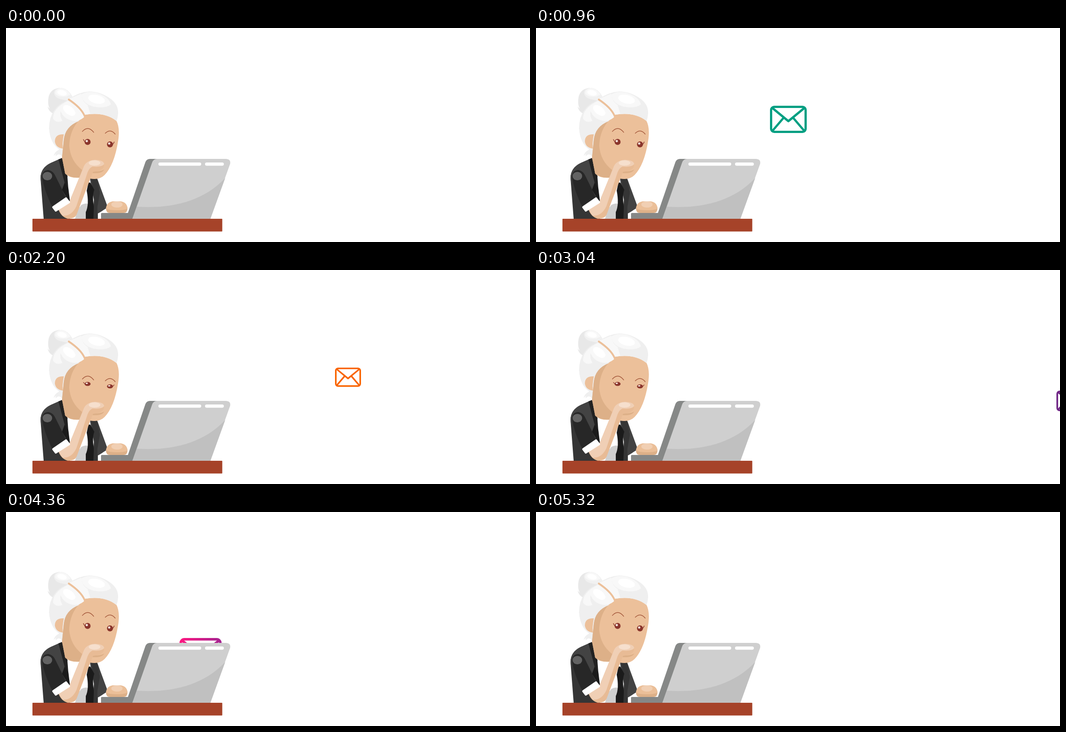
An HTML page for the animation above (5600 ms loop, 1169 px wide and 479 px high).

```html
<!DOCTYPE html>
<html lang="en">
<head>
<meta charset="utf-8">
<title>Mail at the laptop</title>
<style>
html, body { margin: 0; width: 100%; height: 100%; overflow: hidden; background: #fff; }
svg { display: block; width: 100%; height: 100%; }
</style>
</head>
<body>
<svg viewBox="0 0 1169 479">
  <defs>
    <linearGradient id="pink" gradientUnits="userSpaceOnUse" x1="0" y1="0" x2="82" y2="0">
      <stop stop-color="#ff1780"/><stop offset="1" stop-color="#a42290"/>
    </linearGradient>
    <g id="envelope" fill="none" stroke-width="5" stroke-linejoin="round">
      <rect x="2.5" y="2.5" width="77" height="56" rx="7"/>
      <path d="M4 4L41 34.5 78 4M4 58L29.5 28M78 58L52.5 28"/>
    </g>
  </defs>

  <g id="mail"></g>

  <g id="jacket">
    <path fill="#353535" d="M125 291L100 302Q77 313 77 336L84 427H150L142 385 138 335Z"/>
    <path fill="#434343" d="M118 294L100 302Q77 313 77 336L79 350Q80 318 95 318Q105 320 111 333L126 362 131 346Z"/>
    <path fill="#222" d="M117 294L125 291 138 335 139 358 131 347Z"/>
    <path fill="#fff" d="M137 333H186L181 360 184 395 179 427H142L141 385Z"/>
    <path fill="#cfcfcf" d="M154 427L161 404Q166 400 168 396Q177 391 183 394L179 427Z"/>
    <path fill="#434343" d="M187 336H203L225 396Q223 406 205 415V427H192L196 385Z"/>
    <path fill="#353535" d="M190 337H203L211 360 204 400V427H192L197 385Z"/>
    <path fill="#434343" d="M203 336L225 396 223 404 205 415 211 375Z"/>
    <path fill="#1b1b1b" d="M184 346L180 364Q186 395 178 412V427H195L196 400Q192 375 197 362L188 346Z"/>
    <path fill="#fff" d="M205 416L222 406 226 414H212V427H205Z"/>
    <path fill="#272727" d="M80 333Q81 318 95 318Q106 320 111 333L133 379 104 402Q86 366 80 333Z"/>
    <path fill="#1b1b1b" d="M131 346L139 358 143 390 125 362Z"/>
    <ellipse cx="92.3" cy="331.5" rx="10.7" ry="9.5" fill="#636363"/>
  </g>

  <g id="head">
    <path fill="#e8e8e8" d="M148 154Q138 135 121 134Q100 135 95 154Q92 172 98 181L93 176Q95 186 104 191L130 172Z"/>
    <path fill="#f1f1f1" d="M148 153Q137 134 121 134Q108 136 107 144Q108 157 125 160L139 163Z"/>
    <path fill="#f8f8f8" d="M144 149Q136 136 122 134Q108 138 110 147Q117 156 135 153Z"/>
    <ellipse cx="125" cy="145" rx="11" ry="6" fill="#fff" transform="rotate(15 125 145)"/>
    <path fill="#efefef" d="M138 162Q97 177 96 224Q98 258 119 272Q108 277 106 287L112 281Q110 285 111 287Q119 278 126 289L135 240 160 211Q176 205 175 197Q164 177 138 162Z"/>
    <path fill="#ecc09a" d="M177 194Q218 187 246 207Q254 222 251 247Q243 305 220 329Q208 341 187 337L164 335Q143 337 132 326L125 290 129 250Q133 223 160 210Z"/>
    <path fill="#ddb088" d="M161 209Q132 221 129 250L125 290 132 326Q143 336 164 335L170 318Q144 298 141 264Q142 231 161 209Z"/>
    <path fill="#ddb088" d="M190 320Q207 323 219 317Q215 326 194 325Z"/>
    <path fill="#ecc09a" d="M129 238Q109 237 109 254Q111 268 127 270Q125 258 129 238Z"/>
    <path fill="#efefef" d="M140 159Q163 143 186 142Q213 143 234 159Q251 172 250 191Q249 205 246 208Q220 187 177 194Q168 176 140 159Z"/>
    <path fill="#f8f8f8" d="M168 149Q180 140 202 145Q229 153 234 171Q222 181 195 176Q170 169 168 149Z"/>
    <path fill="#f8f8f8" d="M140 159L168 147Q169 164 182 172L188 192 177 194Q168 176 140 159Z"/>
    <ellipse cx="202" cy="159.500" rx="19" ry="9.500" fill="#fff" transform="rotate(14 202 159.5)"/>
    <path fill="#f8f8f8" d="M138 163Q175 186 174 200Q160 211 147 207Q128 203 122 186Q119 196 126 208Q112 214 105 203Q104 180 138 163Z"/>
    <ellipse cx="141" cy="184.500" rx="16" ry="9" fill="#fff" transform="rotate(38 141 184.5)"/>
    <path fill="none" stroke="#ecc09a" stroke-width="4" stroke-linecap="round" d="M140 160Q167 178 175 196"/>
    <g id="brows" fill="none" stroke="#a4583b" stroke-width="1.4">
      <path d="M170 232Q183 217 196 234M221 236Q233 224 244 238"/>
    </g>
    <g id="eyes"></g>
  </g>

  <g id="arm">
    <path fill="#e8bb95" d="M117 406L141 390 172 314Q177 296 199 295Q219 296 219 307Q217 320 194 322L157 419Q152 427 138 427Q123 423 117 406Z"/>
    <path fill="#f0cfb5" d="M117 406L141 390 172 314Q177 296 199 295Q219 296 219 305Q213 312 193 310Q186 313 182 323L157 399Q146 422 126 420Z"/>
    <ellipse cx="197.500" cy="302" rx="13" ry="6" fill="#f6dfcd"/>
    <path fill="#fff" stroke="#fff" stroke-width="4" stroke-linejoin="round" d="M105 401L134 381 141 390 111 409Z"/>
  </g>

  <g id="hand">
    <path fill="#ddb088" d="M223 404Q225 389 240 388H255Q270 390 271 404Q271 414 262 414H232Q223 414 223 404Z"/>
    <path fill="#ebbf98" d="M223 404Q225 389 240 388H255Q270 390 271 404Q265 408 248 408Q230 408 223 404Z"/>
    <ellipse cx="247.500" cy="395" rx="12.500" ry="7" fill="#f1cfb3"/>
  </g>

  <g id="laptop">
    <path fill="#868887" d="M212 415L214 414H272L311 300Q314 293 321 293H340L290 427H212Z"/>
    <path fill="#cfcfcf" d="M282 427L326 301Q329 293 337 293H491Q502 294 500 304L456 427Z"/>
    <path fill="#c0c0c0" d="M292 400C370 405 440 388 489 336L456 427H282Z"/>
    <rect x="340" y="301" width="95.500" height="7.200" rx="3.600" fill="#fff"/>
    <rect x="444" y="301" width="42" height="7.200" rx="3.600" fill="#fff"/>
  </g>
  <rect x="59" y="427" width="423.500" height="28.500" rx="1" fill="#a64329"/>
</svg>

<script>
const LOOP = 5600, STEP = 40;

// Each path point is [time, centre x, centre y].
const letters = [
  { color: '#009f82', width: 82, path: [
    [200, 1204, 107], [480, 968, 152], [760, 731, 189.5], [960, 563, 204.5], [1120, 440, 256], [1240, 405, 330]] },
  { color: '#f96400', width: 58, path: [
    [1840, 449, 354], [2000, 592, 322], [2200, 763, 240], [2400, 948, 104], [2680, 1196, 36]] },
  { color: '#6f2585', width: 62, path: [
    [3040, 1192, 293], [3360, 880, 217], [3600, 653, 242], [3760, 510, 285], [3880, 430, 322]] },
  { color: 'url(#pink)', width: 94, path: [
    [4360, 434, 317], [4560, 580, 228], [4720, 712, 173], [4800, 782, 166],
    [4880, 859.5, 186], [4920, 898.5, 202], [5280, 1212, 319]] }
];
const eyeCentres = [[182, 255, 1], [232, 260.5, -1]];

const byId = id => document.getElementById(id);
const ramp = (t, from, to) => Math.min(1, Math.max(0, (t - from) / (to - from)));
const smooth = u => u * u * (3 - 2 * u);

function add(parent, tag, attributes) {
  const node = document.createElementNS('http://www.w3.org/2000/svg', tag);
  for (const name in attributes) node.setAttribute(name, attributes[name]);
  return parent.appendChild(node);
}

for (const letter of letters)
  letter.node = add(byId('mail'), 'use', { href: '#envelope', stroke: letter.color });

const eyes = eyeCentres.map(([x, y, side]) => {
  const eye = add(byId('eyes'), 'g', {});
  add(eye, 'path', { d: `M${-9.5 * side} -6Q${-8 * side} -1 ${-4 * side} 1`,
    fill: 'none', stroke: '#8a352c', 'stroke-width': 1.4 });
  add(eye, 'circle', { r: 6.7, fill: '#8a352c' });
  add(eye, 'circle', { cx: -1.8, cy: -2, r: 2.5, fill: '#f7e8e0' });
  return { node: eye, x, y };
});

// Cubic interpolation through the path points with smooth speed.
function position(path, t) {
  const i = Math.max(0, path.findIndex(point => point[0] >= t) - 1);
  const a = path[i], b = path[i + 1], span = b[0] - a[0], u = (t - a[0]) / span;
  const slope = (j, axis) => {
    const p = path[Math.max(0, j - 1)], q = path[Math.min(path.length - 1, j + 1)];
    return (q[axis] - p[axis]) / (q[0] - p[0]) * span;
  };
  return [1, 2].map(axis => {
    const blend = smooth(u);
    return a[axis] * (1 - blend) + b[axis] * blend
      + slope(i, axis) * u * (1 - u) ** 2 - slope(i + 1, axis) * u * u * (1 - u);
  });
}

function draw(t) {
  for (const { node, width, path } of letters) {
    const visible = t >= path[0][0] && t <= path[path.length - 1][0];
    node.setAttribute('display', visible ? 'inline' : 'none');
    if (!visible) continue;
    const [x, y] = position(path, t);
    node.setAttribute('transform', `translate(${x} ${y}) scale(${width / 82}) translate(-41 -30.5)`);
  }
  const lowered = smooth(ramp(t, 1160, 1360)) - smooth(ramp(t, 3880, 4160));
  const blink = ramp(t, 2320, 2400) - ramp(t, 2440, 2520);
  const openness = (1 - 0.34 * lowered) * (1 - 0.85 * blink);
  byId('brows').setAttribute('transform', `translate(0 ${12.5 * lowered})`);
  for (const { node, x, y } of eyes)
    node.setAttribute('transform', `translate(${x} ${y}) scale(1 ${openness})`);
}

const start = performance.now();
function tick() {
  const elapsed = (performance.now() - start) % LOOP;
  draw(Math.floor(elapsed / STEP) * STEP);
  requestAnimationFrame(tick);
}
tick();
</script>
</body>
</html>
```
